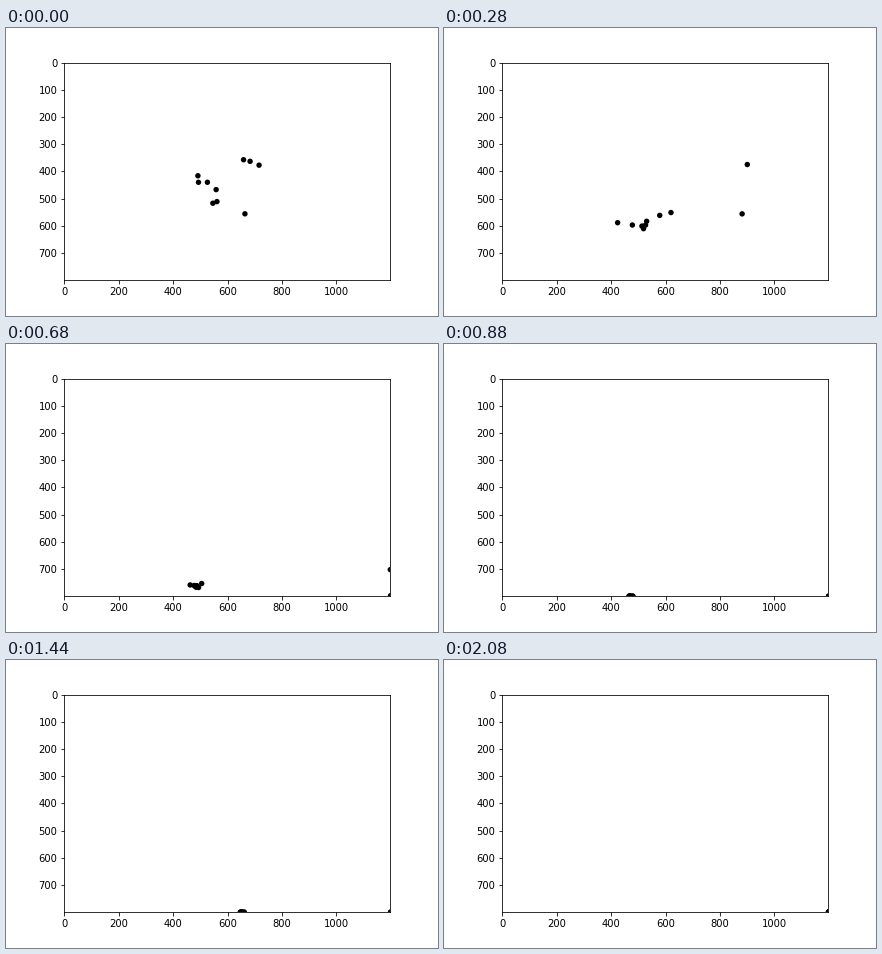
Animation of 432 by 288 pixels, one loop 2.12 s. Source, as a matplotlib script:

```python
import numpy as np
import matplotlib.pyplot as plt
from matplotlib.animation import FuncAnimation
from matplotlib.patches import Circle

W, H, R = 1200, 800, 10
FRAMES, STEP = 53, 40
GATHER = 20  # frames until the flock has closed up
SLIDE = 21.15  # when the flock starts to slide right

# Start (x, y) and sideways kick (x, y) of each flock member.
FLOCK = np.array([
    (491, 416, -17.5, 8), (493, 440, -3, 9), (526, 440, 3.5, 16),
    (546, 517, -1, 0), (561, 511, 0.5, -1), (558, 467, 2, -2),
    (664, 556, 0, -26), (659, 357, 12, -3),
])

t = np.arange(FRAMES)[:, None]


def flock_path(start, kick, centre):
    """Drift of the centre plus an offset that fades as the flock closes."""
    x = centre[0] - 5.8 * t + 0.075 * t**2
    x = x + 0.918 * np.maximum(t - SLIDE, 0) ** 2
    y = centre[1] + 17.6 * t
    fade = np.clip(1 - t / GATHER, 0, 1) ** np.array([1.5, 3])
    offset = (start - centre) * np.maximum(fade, 0.08) + kick * t * fade
    return np.hstack([x, y]) + offset


def stray_path(start, speed, accel):
    return np.array(start) + np.array(speed) * t + np.array(accel) * t**2


starts, kicks = FLOCK[:, :2], FLOCK[:, 2:]
paths = [flock_path(s, k, starts.mean(axis=0)) for s, k in zip(starts, kicks)]
paths += [stray_path((683, 363), (27, 29), (0.2, -0.2)),
          stray_path((716, 377), (25, -14), (0.2, 1.95))]
# The strays leave the flock; the walls hold every particle inside.
paths = [np.clip(p, 0, (W, H)) for p in paths]
for p in paths[-2:]:
    p[:] = np.maximum.accumulate(p) if p[1, 1] > p[0, 1] else p

plt.rcParams.update({"font.family": "DejaVu Sans", "font.size": 10})
fig, ax = plt.subplots(figsize=(6, 4), dpi=72, facecolor="white")
fig.subplots_adjust(left=0.125, right=0.9, bottom=0.125, top=0.88)
ax.set(xlim=(-0.5, W - 0.5), ylim=(H - 0.5, -0.5), aspect="equal",
       xticks=range(0, W, 200), yticks=range(0, H, 100))

dots = [ax.add_patch(Circle(p[0], R, color="black", lw=0)) for p in paths]


def update(n):
    for dot, p in zip(dots, paths):
        dot.center = p[n]
    return dots


anim = FuncAnimation(fig, update, frames=FRAMES, interval=STEP,
                     repeat=True, repeat_delay=0)
plt.show()
```
